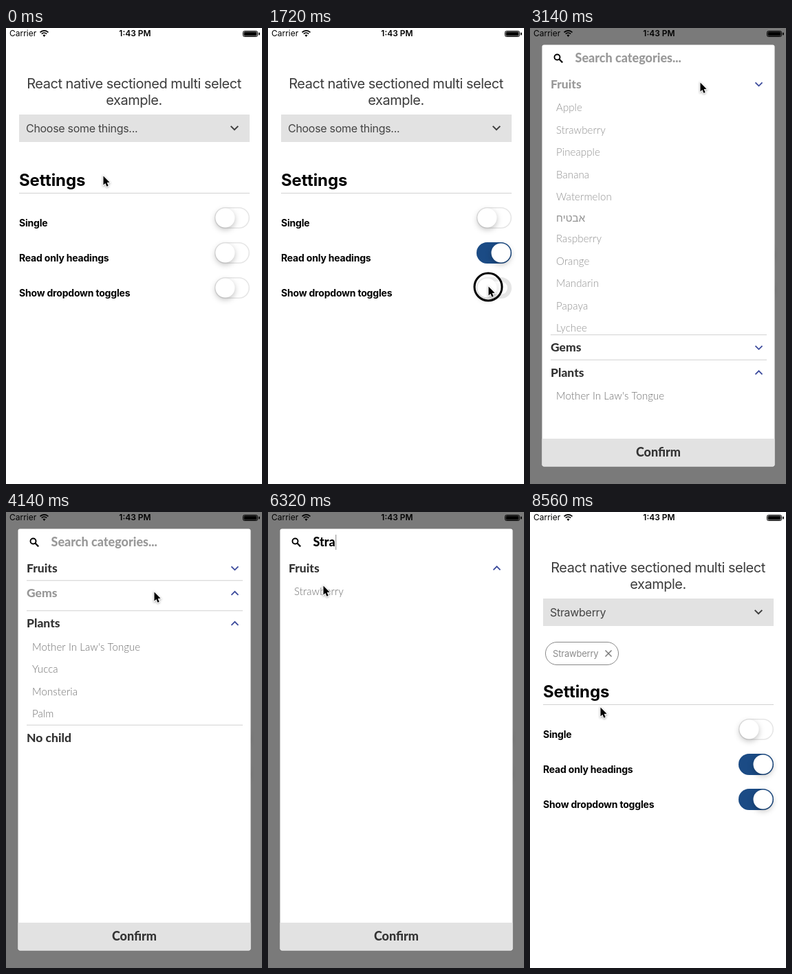
These frames come from a looping animation (372 by 664 pixels, 8580 ms). An HTML page with a canvas:

```html
<!DOCTYPE html>
<html lang="en">
<head>
<meta charset="utf-8">
<title>Sectioned multi select</title>
<style>
html, body { margin: 0; width: 100%; height: 100%; overflow: hidden; background: #fff; }
canvas { display: block; }
</style>
</head>
<body>
<canvas id="stage" width="372" height="664"></canvas>
<script>
const ctx = document.getElementById('stage').getContext('2d');
const LOOP = 8580;
const UI = 'Inter, Roboto, sans-serif';
const LIST = 'Lato, "Liberation Sans", sans-serif';
const ROW = 32.5, HEBREW_ROW = 28.3, HEADER = 36.5;
const LIST_TOP = 63.3, LIST_BOTTOM = 598;

const SECTIONS = [
  { name: 'Fruits', rows: ['Apple', 'Strawberry', 'Pineapple', 'Banana', 'Watermelon', 'אבטיח', 'Raspberry',
    'Orange', 'Mandarin', 'Papaya', 'Lychee', 'Cherry', 'Peach', 'Apricot'] },
  { name: 'Gems', rows: ['Quartz', 'Zircon', 'Sapphire', 'Topaz'] },
  { name: 'Plants', rows: ["Mother In Law's Tongue", 'Yucca', 'Monsteria', 'Palm'] },
  { name: 'No child', rows: [] }
];

// Pointer stops: time, x, y
const PATH = [
  [0, 141, 215], [60, 141, 215], [700, 318, 326], [1080, 318, 326], [1480, 320, 376],
  [1900, 320, 376], [2200, 290, 148], [2620, 290, 148], [2760, 300, 568], [2850, 300, 568],
  [2990, 247, 79], [3500, 247, 79], [3900, 215, 116], [4520, 215, 116], [4780, 114, 43],
  [5260, 114, 43], [5380, 80, 107], [7380, 80, 107], [7920, 143, 618], [8180, 143, 618], [8560, 102, 284]
];
const CLICKS = [[790, 890], [1620, 1730], [2200, 2290], [2770, 2840], [2990, 3070],
  [3950, 4080], [4790, 4880], [6760, 6900], [7940, 8070]];
const KEYS = [[5520, 'S'], [5820, 'St'], [5960, 'Str'], [6100, 'Stra']];

const clamp = v => Math.max(0, Math.min(1, v));
const linear = (t, a, b) => clamp((t - a) / (b - a));
const ramp = (t, a, b) => { const p = linear(t, a, b); return p * p * (3 - 2 * p); };
const cubic = p => p < 0.5 ? 4 * p ** 3 : 1 - 4 * (1 - p) ** 3;
const mix = (a, b, p) => a + (b - a) * p;
const pulse = (t, a, b) => linear(t, a, a + 40) * (1 - linear(t, b - 60, b));

function fade(alpha, draw) {
  if (alpha <= 0) return;
  ctx.save();
  ctx.globalAlpha *= alpha;
  draw();
  ctx.restore();
}

function text(str, x, y, size, { weight = 400, color = '#000', font = UI, align = 'left', spacing = 0 } = {}) {
  ctx.font = `${weight} ${size}px ${font}`;
  ctx.letterSpacing = spacing + 'px';
  ctx.textAlign = align;
  ctx.fillStyle = color;
  ctx.fillText(str, x, y + size * 0.36);
  return ctx.measureText(str).width;
}

function box(x, y, w, h, r, color) {
  ctx.fillStyle = color;
  ctx.beginPath();
  ctx.roundRect(x, y, w, h, r);
  ctx.fill();
}

function outline(x, y, w, h, r, color) {
  ctx.strokeStyle = color;
  ctx.lineWidth = 1;
  ctx.beginPath();
  ctx.roundRect(x, y, w, h, r);
  ctx.stroke();
}

function line(color, width, ...points) {
  ctx.strokeStyle = color;
  ctx.lineWidth = width;
  ctx.beginPath();
  points.forEach(([x, y]) => ctx.lineTo(x, y));
  ctx.stroke();
}

function circle(x, y, r) {
  ctx.beginPath();
  ctx.arc(x, y, r, 0, Math.PI * 2);
}

function chevron(x, y, up, color, size, width) {
  const d = (up ? -0.5 : 0.5) * size;
  line(color, width, [x - size, y - d], [x, y + d], [x + size, y - d]);
}

function statusBar() {
  text('Carrier', 5, 8, 12);
  text('1:43 PM', 187.5, 8, 12, { weight: 600, align: 'center' });
  ctx.strokeStyle = '#000';
  ctx.lineWidth = 1.7;
  for (const r of [5, 8.2]) {
    ctx.beginPath();
    ctx.arc(55.5, 12, r, -Math.PI * 0.76, -Math.PI * 0.24);
    ctx.stroke();
  }
  ctx.fillStyle = '#000';
  ctx.beginPath();
  ctx.moveTo(55.5, 13);
  ctx.arc(55.5, 12, 2.4, -Math.PI * 0.8, -Math.PI * 0.2);
  ctx.fill();
  outline(344.5, 4.5, 21, 8, 2, '#000');
  box(345.6, 5.6, 18.8, 5.8, 1, '#000');
  box(367, 6.5, 1.8, 4, 1, '#000');
}

function toggle(y, on, press) {
  const x = 303, top = y - 15.5;
  box(x, top, 51, 31, 15.5, '#e5e5e5');
  const inset = mix(1.5, 6, press);
  box(x + inset, top + inset, 51 - 2 * inset, 31 - 2 * inset, 15.5 - inset, '#fff');
  fade(on, () => box(x, top, 51, 31, 15.5, '#1b4b85'));
  ctx.save();
  ctx.shadowColor = 'rgba(0,0,0,0.25)';
  ctx.shadowBlur = 9;
  ctx.shadowOffsetY = 3;
  ctx.fillStyle = '#fff';
  circle(mix(318.5, 338.5, on), y, 14);
  ctx.fill();
  ctx.restore();
}

function page(t) {
  const chosen = t > 8070;
  const shift = chosen ? 40 : 0;
  const title = { color: '#3c3c3c', align: 'center', spacing: -0.48 };
  text('React native sectioned multi select', 186, 81, 20, title);
  text('example.', 186, 104.5, 20, title);
  box(19, 126, 335, 40, 0, '#e2e2e2');
  text(chosen ? 'Strawberry' : 'Choose some things...', 29, 146.5, 16, { color: '#444', spacing: -0.3 });
  chevron(332, 145.5, false, '#3c3c3c', 5.3, 2);

  if (chosen) {
    outline(22.5, 189.5, 106, 33, 16.5, '#888');
    text('Strawberry', 33, 206, 13, { color: '#8c8c8c', spacing: -0.2 });
    line('#777', 1.4, [109.5, 201.5], [118.5, 210.5]);
    line('#777', 1.4, [118.5, 201.5], [109.5, 210.5]);
  }

  text('Settings', 19, 221 + shift, 24, { weight: 700, spacing: -0.15 });
  box(19, 240 + shift, 335, 1, 0, '#d2d2d2');
  const settings = [
    ['Single', 0, 0],
    ['Read only headings', ramp(t, 890, 1070), pulse(t, 800, 940)],
    ['Show dropdown toggles', ramp(t, 1740, 1920), pulse(t, 1640, 1800)]
  ];
  settings.forEach(([label, on, press], i) => {
    const y = 276.5 + 51 * i + shift;
    text(label, 19, y + 7.5, 14, { weight: 700, spacing: -0.2 });
    toggle(y, on, press);
  });
}

function tick(x, y) {
  line('#58b55c', 1.6, [x - 5.5, y + 0.5], [x - 2, y + 4], [x + 5.5, y - 4]);
}

function section(y, { name, rows }, { open = 1, up = true, dim = 0, rowDim = 0, checked = 0, first }) {
  if (!first) box(30, y - 0.5, 314, 1, 0, '#d0d0d0');
  fade(1 - dim, () => text(name, 30, y + 18, 17.5, { weight: 800, color: '#333', font: LIST }));
  if (rows.length) chevron(332.5, y + 18.5, up, '#3b4a9c', 5, 1.8);

  const heights = rows.map(r => r === 'אבטיח' ? HEBREW_ROW : ROW);
  const height = heights.reduce((a, b) => a + b, 0) * open;
  const top = y + HEADER;
  fade(open, () => {
    ctx.beginPath();
    ctx.rect(18, top, 337, height);
    ctx.clip();
    let rowY = top;
    rows.forEach((row, i) => {
      const mid = rowY + heights[i] / 2 - 0.2;
      fade(row === 'Strawberry' ? 1 - rowDim : 1, () =>
        text(row, 38, mid, 15, { weight: 300, color: '#707070', font: LIST, spacing: 0.1 }));
      if (row === 'Strawberry') fade(checked, () => tick(127, mid));
      rowY += heights[i];
    });
  });
  return top + height;
}

function list(t, query) {
  const term = query.toLowerCase();
  const gemsClosed = t >= 2850 && t < 4100;
  const states = {
    Fruits: { open: 1 - ramp(t, 3085, 3265), up: t < 3085, dim: 0.5 * pulse(t, 3010, 3230) },
    Gems: {
      open: t < 4100 ? 1 - ramp(t, 2850, 2980) : ramp(t, 4100, 4380),
      up: !gemsClosed,
      dim: 0.5 * (pulse(t, 2790, 2940) + pulse(t, 3980, 4200))
    }
  };
  let shown = SECTIONS;
  if (term) {
    shown = SECTIONS
      .map(s => ({ ...s, rows: s.rows.filter(r => r.toLowerCase().includes(term)) }))
      .filter(s => s.rows.length);
  } else if (t < 3200) {
    shown = SECTIONS.slice(0, 3).map(s => s.name === 'Plants' ? { ...s, rows: s.rows.slice(0, 1) } : s);
  }

  ctx.save();
  ctx.beginPath();
  ctx.rect(18, LIST_TOP - 1, 337, LIST_BOTTOM - LIST_TOP + 1);
  ctx.clip();
  let y = LIST_TOP;
  shown.forEach((s, i) => {
    const state = term
      ? { rowDim: 0.6 * pulse(t, 6780, 7020), checked: linear(t, 6900, 6980) }
      : states[s.name];
    y = section(y, s, { ...state, first: i === 0 });
  });
  ctx.restore();
}

function modal(t) {
  const query = KEYS.reduce((q, [at, typed]) => t >= at ? typed : q, '');
  box(0, 0, 372, 664, 0, 'rgba(0,0,0,0.52)');
  box(17.5, 24.5, 338, 614, 3, '#fff');

  ctx.strokeStyle = '#000';
  ctx.lineWidth = 1.9;
  circle(39.5, 42.5, 4);
  ctx.stroke();
  line('#000', 2.3, [42.5, 45.5], [47.2, 50.2]);

  const width = text(query || 'Search categories...', 65.5, 44, 18,
    { weight: 800, color: query ? '#000' : '#999', font: LIST });
  if (t >= 4880 && t < 6640) box(66 + (query ? width : 0), 33, 1, 22, 0, '#888');

  list(t, query);

  fade(1 - 0.8 * pulse(t, 7950, 8200), () => {
    box(17.5, 598, 338, 40.5, [0, 0, 3, 3], '#e2e2e2');
    text('Confirm', 186.5, 617.5, 18, { weight: 800, color: '#333', font: LIST, align: 'center' });
  });
}

function pointerAt(t) {
  const i = PATH.findIndex(p => p[0] > t);
  if (i < 0) return PATH[PATH.length - 1].slice(1);
  const [a, b] = [PATH[i - 1], PATH[i]];
  const p = cubic(linear(t, a[0], b[0]));
  return [mix(a[1], b[1], p), mix(a[2], b[2], p)];
}

function pointer(t) {
  const [x, y] = pointerAt(t);
  if (CLICKS.some(([a, b]) => t >= a && t < b)) {
    circle(x, y + 1, 20);
    ctx.fillStyle = 'rgba(255,255,255,0.35)';
    ctx.fill();
    ctx.strokeStyle = '#000';
    ctx.lineWidth = 3;
    ctx.stroke();
  }
  ctx.save();
  ctx.translate(x, y);
  ctx.beginPath();
  [[0.5, 0.5], [0.5, 13.5], [3.4, 10.9], [5.4, 15.8], [7.7, 14.8], [5.7, 10.1], [9.6, 9.8]]
    .forEach(([px, py]) => ctx.lineTo(px, py));
  ctx.closePath();
  ctx.shadowColor = 'rgba(0,0,0,0.35)';
  ctx.shadowBlur = 3;
  ctx.shadowOffsetY = 1;
  ctx.strokeStyle = '#fff';
  ctx.lineWidth = 2;
  ctx.stroke();
  ctx.shadowColor = 'transparent';
  ctx.fillStyle = '#000';
  ctx.fill();
  ctx.restore();
}

function render(t) {
  box(0, 0, 372, 664, 0, '#fff');
  page(t);
  statusBar();
  fade(ramp(t, 2320, 2540) * (1 - ramp(t, 8110, 8360)), () => modal(t));
  pointer(t);
}

const start = performance.now();
function loop() {
  render((performance.now() - start) % LOOP);
  requestAnimationFrame(loop);
}
loop();
</script>
</body>
</html>
```
